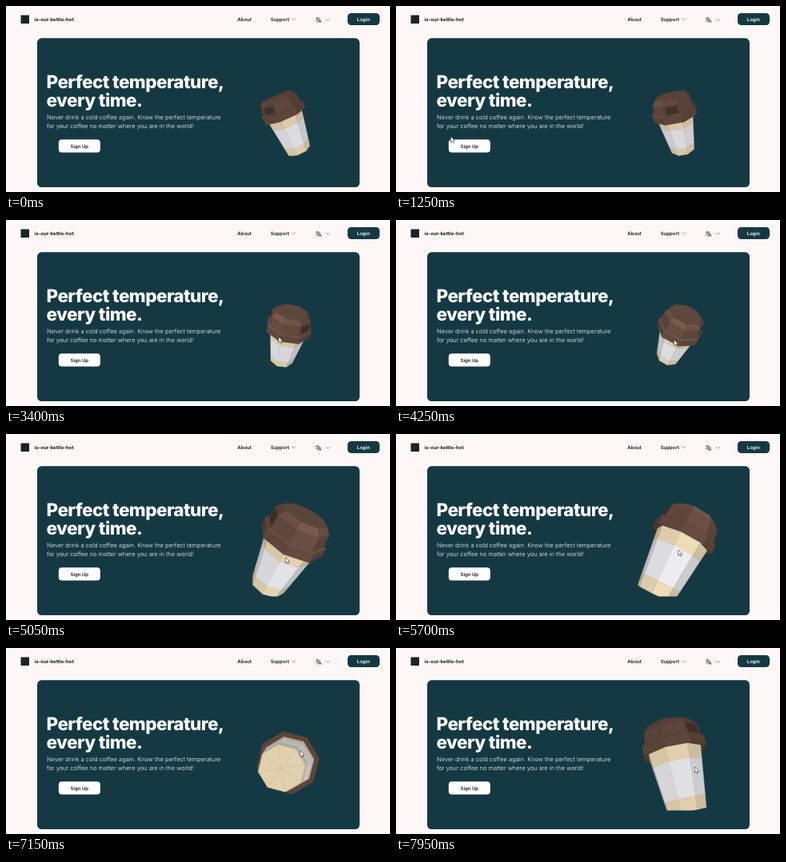
These frames come from a looping animation (480 by 233 pixels, 8 s). An HTML page:

```html
<!DOCTYPE html>
<html lang="en">
<head>
<meta charset="utf-8">
<title>Perfect temperature</title>
<style>
  html, body { margin: 0; width: 100%; height: 100%; overflow: hidden; background: #fdf8f7; }
  svg { display: block; width: 100vw; height: 100vh; }
  text { font-family: Inter, sans-serif; text-rendering: geometricPrecision; }
  .small { font-size: 6px; font-weight: 600; fill: #10181d; }
  .title { font-size: 22.5px; font-weight: 800; letter-spacing: -.025em; fill: #fff; }
  .copy { font-size: 7.5px; font-weight: 300; fill: #f4f6f6; }
  .line { fill: none; stroke: #555c60; stroke-width: .6; }
</style>
</head>
<body>
<svg viewBox="0 0 480 233">
  <defs><clipPath id="view"><rect x="290" y="87" width="116" height="116.5"/></clipPath></defs>

  <rect x="18.5" y="11.5" width="10.5" height="10.5" fill="#1b2529"/>
  <text class="small" x="35.5" y="18.7" style="font-weight:700">is-our-kettle-hot</text>
  <text class="small" x="289.3" y="18.7">About</text>
  <text class="small" x="330.7" y="18.7">Support</text>
  <path class="line" d="M357 15.4l2.5 2.5 2.5-2.5M400 15.9l2.5 2.5 2.5-2.5"/>
  <path class="line" style="stroke:#20292d;stroke-width:.7"
    d="M387 15.2h4.6M389.3 14.2v1M390.8 15.2q-.8 2.6-3.5 4M388 16.4q.8 1.6 2.4 2.4M390.3 20.8l1.9-4.6 1.9 4.6M391 19.4h2.4"/>
  <rect x="427" y="9" width="40" height="15" rx="4.5" fill="#153943"/>
  <text class="small" x="446.8" y="18.7" text-anchor="middle" style="fill:#fff">Login</text>

  <rect x="39" y="40.3" width="403" height="186.7" rx="5.5" fill="#153943"/>
  <text class="title" x="50.5" y="103.4">Perfect temperature,</text>
  <text class="title" x="50.5" y="125.9">every time.</text>
  <text class="copy" x="51" y="142.4">Never drink a cold coffee again. Know the perfect temperature</text>
  <text class="copy" x="51" y="152.9">for your coffee no matter where you are in the world!</text>
  <rect x="65.8" y="167.2" width="52" height="16.4" rx="4" fill="#fff"/>
  <text class="small" x="91.8" y="177.6" text-anchor="middle">Sign Up</text>

  <g clip-path="url(#view)"><g id="cup" stroke-width=".4" stroke-linejoin="round"></g></g>
  <path id="status" d="M0 230.4h46.5q1.5 0 1.5 1.5v1.1H0z" fill="#d2d0d0"/>
  <path id="cursor" d="M0 0V7.2L1.7 5.7 2.8 8.2 4 7.7 2.9 5.2H5.2Z" fill="#fff" stroke="#222" stroke-width=".55"/>
</svg>
<script>
const LOOP = 8, SIDES = 8, CAMERA = 200, TILT = 26, SPIN = 2;
const BEIGE = [245, 226, 188], PAPER = [244, 243, 246], BROWN = [102, 76, 64];

// Rings from bottom to top; each colour paints the band above its ring
const bodyRing = (y, color) => ({ y, r: 16 + 7 * (y + 40) / 50, color });
const lidRing = (y, r) => ({ y, r, color: BROWN });
const rings = [
  { y: -40, r: 0, color: BEIGE },
  bodyRing(-40, BEIGE), bodyRing(-30, PAPER), bodyRing(-1, BEIGE), bodyRing(10, BROWN),
  lidRing(9, 27.5), lidRing(17, 27.5), lidRing(18, 25), lidRing(29, 23.5), lidRing(34, 19), lidRing(34, 0)
];
const GROOVED_BAND = rings.length - 4;

// Eased progress from 0 to 1 between two times in seconds
function ramp(t, start, end) {
  const u = Math.min(1, Math.max(0, (t - start) / (end - start)));
  return u * u * (3 - 2 * u);
}

function sceneAt(t) {
  const enter = ramp(t, .25, 1.15), hover = ramp(t, 1.3, 1.65), leave = ramp(t, 1.85, 2.45);
  const lift = ramp(t, 2.6, 4.15), grow = ramp(t, 4.35, 5), dive = ramp(t, 5.3, 6.2);
  const swing = ramp(t, 6.35, 7.7), settle = ramp(t, 7.6, 7.95);
  return {
    azimuth: -58 + 24 * Math.min(t, 2.5) + 43 * lift + 30 * grow + 23 * dive + 110 * swing,
    elevation: 22 * lift - 82 * dive + 72 * settle,
    zoom: 1 + .5 * grow,
    x: 484 - 415.5 * enter + 25 * hover + 240 * leave + 14 * lift + 2 * grow + 8 * dive + 16 * swing,
    y: 226 - 62.5 * enter + 8 * hover - 29 * leave + 7.5 * lift + 4.5 * grow - 22.5 * dive - 5 * swing + 22 * settle
  };
}

function rotate(a, b, degrees) {
  const r = degrees * Math.PI / 180, c = Math.cos(r), s = Math.sin(r);
  return [a * c - b * s, a * s + b * c];
}

function orient([x, y, z], { azimuth, elevation }, tilt = TILT) {
  [y, z] = rotate(y, z, tilt);
  [z, x] = rotate(z, x, azimuth);
  [y, z] = rotate(y, z, elevation);
  return [x, y, z];
}

const subtract = (a, b) => a.map((v, i) => v - b[i]);
const dot = (a, b) => a.reduce((sum, v, i) => sum + v * b[i], 0);
const cross = (a, b) => [0, 1, 2].map(i => {
  const j = (i + 1) % 3, k = (i + 2) % 3;
  return a[j] * b[k] - a[k] * b[j];
});

function polygon(points, zoom, color, shade) {
  const path = points.map(([x, y, z]) => {
    const f = zoom * CAMERA / (CAMERA - z);
    return (351 + x * f).toFixed(2) + ',' + (145 - y * f).toFixed(2);
  }).join(' ');
  const paint = `rgb(${color.map(v => Math.round(Math.min(255, v * shade)))})`;
  return `<polygon points="${path}" fill="${paint}" stroke="${paint}"/>`;
}

function inset(points) {
  const center = [0, 1, 2].map(i => points.reduce((sum, p) => sum + p[i] / 4, 0));
  return points.map(p => p.map((v, i) => center[i] + (v - center[i]) * .72));
}

function drawCup(scene) {
  const points = rings.map(({ y, r }) => Array.from({ length: SIDES }, (_, k) => {
    const [z, x] = rotate(r, 0, k * 360 / SIDES + SPIN);
    return orient([x, y, z], scene);
  }));
  // The lamp stays beside the cup while the camera orbits
  const lamp = orient([-.6, .5, .6], scene, 0);
  const bands = [...Array(rings.length - 1).keys()];
  // Bands nearer to the viewer go on top
  if (orient([0, 1, 0], scene)[2] < 0) bands.reverse();

  let out = '';
  for (const i of bands) for (let k = 0; k < SIDES; k++) {
    const next = (k + 1) % SIDES;
    const face = [points[i][k], points[i][next], points[i + 1][next], points[i + 1][k]];
    const normal = cross(subtract(face[2], face[0]), subtract(face[3], face[1]));
    const middle = face[0].map((v, j) => (v + face[2][j]) / 2);
    if (dot(normal, subtract([0, 0, CAMERA], middle)) <= 0) continue;
    const length = Math.hypot(...normal);
    const facing = Math.max(0, normal[2] / length), lit = Math.max(0, dot(normal, lamp) / length);
    const shade = .7 + .22 * facing + .3 * lit ** 3;
    const { color } = rings[i];
    out += polygon(face, scene.zoom, color, shade);
    if (i === GROOVED_BAND && k % 4 === 0) out += polygon(inset(face), scene.zoom, color, shade * .72);
  }
  return out;
}

const [cup, status, cursor] = ['cup', 'status', 'cursor'].map(id => document.getElementById(id));

function render(now) {
  const t = now / 1000 % LOOP;
  const scene = sceneAt(t);
  cup.innerHTML = drawCup(scene);
  cursor.setAttribute('transform', `translate(${scene.x} ${scene.y})`);
  status.style.display = t >= 1.8 && t < 2.55 ? '' : 'none';
  requestAnimationFrame(render);
}
render(performance.now());
</script>
</body>
</html>
```
